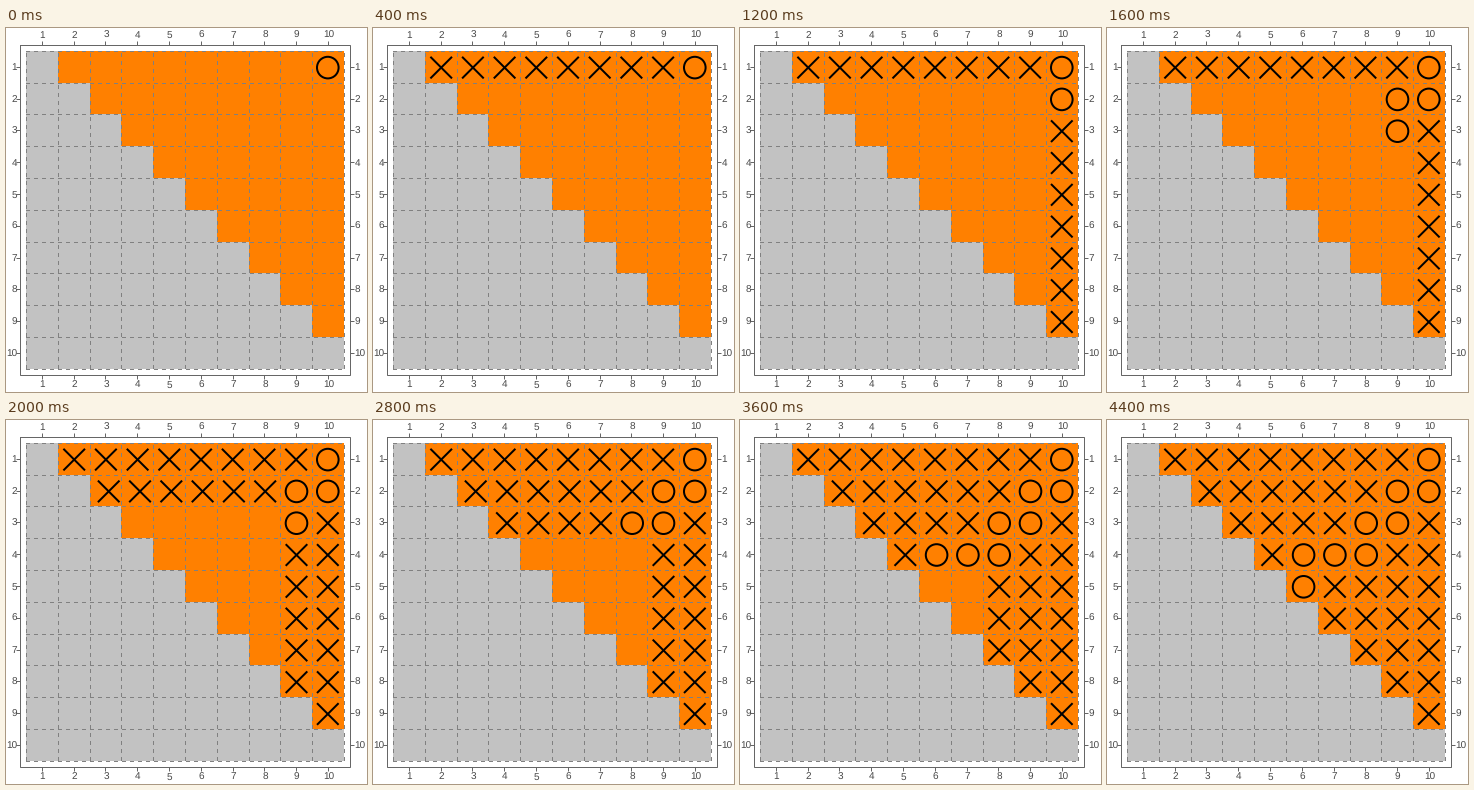
Recreate the animation shown at these times as a matplotlib script. Size 361 by 364 pixels, loop 4800 ms.

```python
import math

import matplotlib.pyplot as plt
from matplotlib.animation import FuncAnimation
from matplotlib.patches import Circle, Rectangle

W, H, DPI = 361, 364, 100
PX = 72 / DPI            # points per pixel
N = 10
X0, Y0, CELL = 20.45, 23.35, 31.8
LEFT, TOP, RIGHT, BOTTOM = 14.5, 17.5, 344.5, 347.5
TICK = 4
ORANGE, GREY, DASH, INK, TEXT = "#ff8000", "#c2c2c2", "#808080", "#666666", "#484848"

# Marks are laid out from the right edge, the top row a little wider.
MARK_X, MARK_Y, MARK_R = 321.8, 39.6, 10.8
TOP_PITCH, PITCH = 31.7, 31.3

# Cells (row, column) found at each even step; the following odd step
# crosses out the rest of the listed rows and columns.
FOUND = [
    [(1, 10)], [(2, 10)], [(2, 9), (3, 9)],
    [(3, 8)], [(4, 8), (4, 7), (4, 6)], [(5, 6)],
]
CLOSED = [
    ([1], []), ([], [10]), ([2], [9]),
    ([3], []), ([4], [8]), ([], [7]),
]

plt.rcParams["text.hinting"] = "none"
plt.rcParams["text.hinting_factor"] = 1
fig = plt.figure(figsize=(W / DPI, H / DPI), dpi=DPI, facecolor="white")
ax = fig.add_axes([0, 0, 1, 1])
ax.set_xlim(0, W)
ax.set_ylim(H, 0)
ax.axis("off")


def edge_x(k):
    return math.floor(X0 + k * CELL)


def edge_y(k):
    return math.floor(Y0 + k * CELL)


def line(xs, ys, color, width, **kw):
    return ax.plot(xs, ys, color=color, lw=width * PX, snap=False,
                   solid_capstyle="butt", dash_capstyle="butt", **kw)[0]


def fill(col, top, bottom, color):
    """Fill the cells from column `col` to the right edge."""
    x, y = edge_x(col), edge_y(top)
    ax.add_patch(Rectangle((x, y), edge_x(N) - x, edge_y(bottom) - y,
                           fc=color, lw=0, snap=False, antialiased=False))


def draw_board():
    fill(0, 0, N, GREY)
    for row in range(1, N):
        fill(row, row - 1, row, ORANGE)
    for k in range(N + 1):
        x, y = edge_x(k) + 0.5, edge_y(k) + 0.5
        line([x, x], [edge_y(N), edge_y(0)], DASH, 1, dashes=(4, 4))
        line([edge_x(0), edge_x(N)], [y, y], DASH, 1, dashes=(4, 4))


def draw_frame():
    line([LEFT, RIGHT, RIGHT, LEFT, LEFT], [TOP, TOP, BOTTOM, BOTTOM, TOP],
         INK, 1, solid_joinstyle="miter")
    font = dict(family="Liberation Sans", size=10 * PX, color=TEXT,
                va="center_baseline")
    for k in range(1, N + 1):
        x, y = X0 + (k - 0.5) * CELL, Y0 + (k - 0.5) * CELL
        tx, ty = math.floor(x) + 0.5, math.floor(y) + 0.5
        for a, b in ((TOP, TOP - TICK), (BOTTOM, BOTTOM + TICK)):
            line([tx, tx], [a, b], INK, 1)
        for a, b in ((LEFT, LEFT - TICK), (RIGHT, RIGHT + TICK)):
            line([a, b], [ty, ty], INK, 1)
        ax.text(x, 6.2, str(k), ha="center", **font)
        ax.text(x, 355.8, str(k), ha="center", **font)
        ax.text(LEFT - 3.5, y - 0.5, str(k), ha="right", **font)
        ax.text(RIGHT + 4, y - 0.5, str(k), ha="left", **font)


def mark_center(row, col):
    pitch = TOP_PITCH if row == 1 else PITCH
    return MARK_X - (N - col) * pitch, MARK_Y + (row - 1) * CELL


def ring(row, col):
    patch = Circle(mark_center(row, col), MARK_R, fc="none", ec="black",
                   lw=2 * PX)
    return [ax.add_patch(patch)]


def cross(row, col):
    x, y = mark_center(row, col)
    xs = [x - MARK_R, x + MARK_R]
    return [line(xs, [y - d, y + d], "black", 2) for d in (MARK_R, -MARK_R)]


def closed_cells(rows, cols):
    found = sum(FOUND, [])
    for row in rows:
        first = min(c for r, c in found if r == row)
        yield from ((row, c) for c in range(row + 1, first))
    for col in cols:
        last = max(r for r, c in found if c == col)
        yield from ((r, col) for r in range(last + 1, col))


draw_board()
draw_frame()
steps = []
for rings, strips in zip(FOUND, CLOSED):
    steps.append([a for cell in rings for a in ring(*cell)])
    steps.append([a for cell in closed_cells(*strips) for a in cross(*cell)])


def update(i):
    for k, marks in enumerate(steps):
        for mark in marks:
            mark.set_visible(k <= i)
    return []


anim = FuncAnimation(fig, update, frames=len(steps), interval=400,
                     repeat=True, repeat_delay=0)
plt.show()
```
